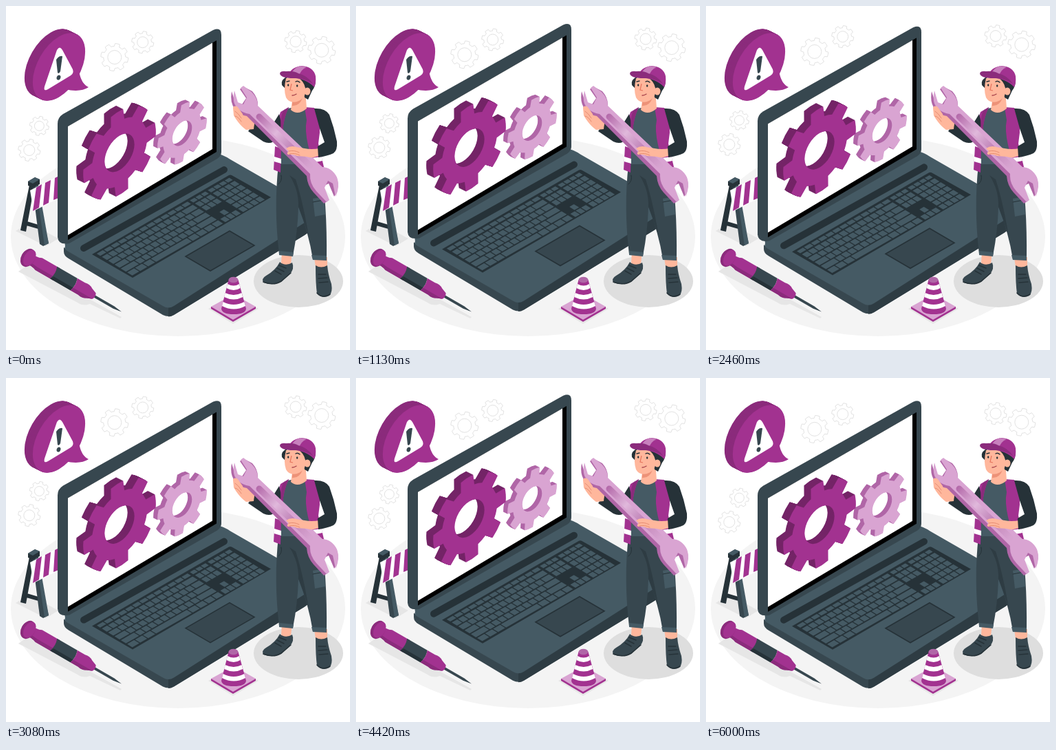
Write an HTML page that moves like this. It is 500 px wide and 500 px high and loops after 6.04 s.

```html
<!DOCTYPE html>
<html lang="en">
<head>
<meta charset="utf-8">
<title>Laptop repair</title>
<style>
html, body { margin: 0; width: 100%; height: 100%; overflow: hidden; background: #fff }
svg { display: block; width: 100vw; height: 100vh }
.p { fill: #a23290 } .d { fill: #742467 } .m { fill: #8b2b7c } .l { fill: #d9a4d2 } .e { fill: #b066a7 }
.s { fill: #455a64 } .g { fill: #37474f } .k { fill: #263238 } .w { fill: #fff } .h { fill: #e6e6e6 }
.skin { fill: #ffb79c } .shade { fill: #ed9278 }
.line { fill: none; stroke: #263238; stroke-linecap: round }
</style>
</head>
<body>
<svg viewBox="0 0 500 500">
<defs>
  <linearGradient id="shine" x1="365" y1="160" x2="442" y2="232" gradientUnits="userSpaceOnUse">
    <stop offset="0" stop-color="#b56bab"/><stop offset=".35" stop-color="#e0b8db"/>
    <stop offset=".65" stop-color="#c083b8"/><stop offset="1" stop-color="#d7a3d0"/>
  </linearGradient>
</defs>
<ellipse cx="250" cy="335" rx="243" ry="145" fill="#f4f4f4"/>
<g id="outlines" fill="none" stroke="#e2e2e2"></g>

<!-- speech bubble -->
<g id="disc"></g>
<path class="p" d="M106 94Q109 113 120 118Q108 126 86 121Z"/>
<path class="w" d="M74 64Q78 57 82 64L97 92Q99 98 94 101L61 121Q54 125 56 117Z"/>
<path class="g" d="M73 78Q77 72 82 73L79 95Q77 99 75 97Z"/>
<ellipse class="g" cx="76.500" cy="104" rx="2.800" ry="3.600" transform="rotate(20 76.500 104)"/>

<!-- barrier -->
<path class="h" d="M14 327L34 315L76 338L58 349Z"/>
<path class="k" d="M34 260L41 262L29 328L21 326ZM27 312L54 320V326L26 318Z"/>
<path class="g" d="M38 260L43 260L62 345L54 349L49 346Z"/>
<path class="s" d="M43 260L47 260L62 345L56 348Z"/>
<path class="w" d="M35 268L82 244V277L40 298Z"/>
<path class="p" d="M44 264L52 259L48 293L39 298ZM57 257L65 253L62 286L54 290ZM71 250L79 246V278L69 282Z"/>
<path class="k" d="M32 255L42 249L49 252V259L39 264L32 261Z"/>
<path class="s" d="M32 255L42 249L49 252L39 258Z"/>

<!-- laptop -->
<g id="laptop">
  <path class="g" d="M84 351V357Q84 363 91 367L228 449Q236 453 244 449L434 333Q444 327 444 318V298L236 436Z"/>
  <path fill="#2e3c43" d="M236 438V451.500Q240 451.500 244 449L434 333Q444 327 444 318V300Z"/>
  <path class="s" d="M86 349Q84 343 92 338L300 212Q318 217 326 223L434 285Q448 294 437 313L244 436Q236 441 228 436L89 356Q84 353 86 349Z"/>
  <path class="line" stroke-width="10" d="M113 352L317 238"/>
  <path class="k" d="M125 361L324 246Q326 245 328 246L385 278L184 395Z"/>
  <g id="keys" class="s" transform="matrix(1.99 -1.14 .57 .35 126 360)"></g>
  <path class="g" stroke="#263238" stroke-width="1.600" d="M261 364L325 327L361 348L297 385Z"/>
  <path class="g" d="M75 171Q75 162 83 157L301 35Q313 30 313 42V212Q313 218 307 222L92 345Q76 348 75 336Z"/>
  <path fill="#000" d="M90 175L306 50V212L90 340Z"/>
  <path class="w" d="M90 175L300 53.500V208L90 333Z"/>
  <g id="cogs"></g>
</g>

<!-- screwdriver -->
<path class="h" d="M18 386L32 376L168 452L166 454L122 433Q112 437 104 431Z"/>
<g transform="translate(32 366) rotate(30)">
  <path class="g" d="M108 -1.600H144L157 0L144 2H108Z"/>
  <path class="p" d="M0 -9Q10 -6 18 -10H48V10H18Q10 7 0 9Z"/>
  <path class="m" d="M3 4Q12 4 18 5H48V10H18Q10 7 0 9Z"/>
  <path class="g" d="M43 -10H77Q81 0 77 10H43Q47 0 43 -10Z"/>
  <path class="k" d="M46 5H79L77 10H43Z"/>
  <path class="p" d="M77 -10H90Q97 -12 103 -8L111 -5Q114 0 111 5L103 8Q97 12 90 10H77Q81 0 77 -10Z"/>
  <path class="m" d="M79 5H111L103 8Q97 12 90 10H77Z"/>
  <ellipse class="m" rx="10" ry="14"/>
  <ellipse class="p" cx="2" cy="-1" rx="8" ry="12.500"/>
</g>

<!-- cone -->
<path class="h" d="M294 440L331 419L367 440L330 462Z"/>
<path class="p" d="M298 437H363V440L330 459L298 440Z"/>
<path class="l" d="M298 437L331 419L363 437L330 456Z"/>
<path class="p" d="M323.500 398L313 440Q314 448 331 448Q348 448 349 440L337.500 398Z"/>
<path class="w" d="M322 404Q331 409 339 404L340.600 410Q331 416 320.500 410ZM318.700 417Q331 423 342.500 417L344.200 423Q331 430 317.200 423ZM315.500 430Q331 438 346.200 430L348 436Q331 445 314 436Z"/>
<ellipse class="e" cx="330.500" cy="398" rx="7" ry="4.300"/>

<!-- worker -->
<ellipse cx="425" cy="400" rx="65" ry="38" fill="#dedede"/>
<path class="skin" d="M401 357H416L414 375Q406 380 400 374ZM448 365H467V381Q458 386 450 380Z"/>
<path class="g" d="M398 372Q406 379 416 373Q420 382 412 390L400 401Q388 407 374 402Q371 396 378 392Q392 384 398 372ZM450 377Q458 382 467 377Q468 390 473 404Q475 416 470 421Q459 426 452 418Q450 404 450 377Z"/>
<path class="line" stroke-width="1.600" d="M374 401Q389 407 400 400L414 388M452 417Q460 426 471 419M391 385L400 390M394 381L404 386M397 377L407 381M454 390H465M454 396L467 395M455 402L468 401"/>
<path class="s" d="M404 151Q420 144 440 150L454 163V204L456 236H397L400 190Z"/>
<path class="g" d="M396 230H457Q467 285 466 369L446 368Q440 330 425 292Q424 328 417 363L397 361Q389 294 396 230Z"/>
<path class="k" d="M412 246Q426 268 425 292Q434 315 440 335Q432 286 421 252Z" opacity=".5"/>
<path class="s" d="M397 356L418 358L417 364L397 362ZM444 362L466 363V370L446 369ZM446 280L462 277L464 303L449 306Z"/>
<path class="line" stroke-width="1" d="M446 285L462 282M400 246Q402 254 396 259"/>

<path class="p" d="M399 154L411 147Q403 164 402 184L388 187ZM391 204L400 207L399 242L389 238ZM434 147L448 148Q457 159 456 184L454 200L462 234L448 238L439 202Q434 180 437 166Z"/>
<path class="w" d="M390 219L400 222V229L389.500 226ZM444 221L458.500 219L460 225L445 228Z"/>
<path class="m" d="M402 153L411 147Q403 164 402 184L396 185Z"/>

<path class="skin" d="M412 128L435 121L437 149Q424 160 414 151L416 138Z"/>
<path class="shade" d="M416 138Q425 140 431 134Q426 146 416 145Z"/>
<path class="k" d="M430 104L450 108Q450 117 445 123L439 136L434 133ZM408 103Q399 107 401 115L406 120L409 108Z"/>
<path class="skin" d="M407 105Q403 122 407 133Q412 142 423 139Q433 135 436 125L434 111L424 104Z"/>
<path class="k" d="M424 104Q433 109 435 119L443 119L447 108Z"/>
<ellipse class="skin" cx="438" cy="124" rx="4.500" ry="5.500"/>
<path class="line" stroke-width="1.400" d="M408 110L412 109M421 110Q424 108 427 111"/>
<path class="k" d="M409 115a1.200 1.700 0 1 0 2.400 0a1.200 1.700 0 1 0 -2.400 0M422 116a1.200 1.700 0 1 0 2.400 0a1.200 1.700 0 1 0 -2.400 0"/>
<path fill="none" stroke="#e6765e" stroke-width="1.200" d="M415 113L413 122L417 123"/>
<path fill="none" stroke="#a5404a" stroke-width="1.300" stroke-linecap="round" d="M416 130Q419 130 422 128"/>
<path class="p" d="M410 101Q414 89 429 87Q447 88 450 102Q451 112 448 118Q436 105 413 104Z"/>
<path fill="#c780bd" d="M416 96Q420 89 428 87L437 89Q428 92 425 104L414 103Z"/>
<path class="m" d="M398 98Q399 94 407 95Q418 94 425 98Q438 101 446 113Q433 104 418 105Q399 105 398 98Z"/>

<path class="k" d="M352 182L362 168L384 178L397 157Q403 174 394 192Q386 203 374 197Z"/>
<path class="skin" d="M330 147Q333 143 338 149L350 158L361 170L360 179L349 180Q339 173 332 160Z"/>

<!-- wrench -->
<path class="e" d="M328 124Q325 141 333 150Q341 159 350 160L437 247Q438 261 447 271L462 287L467 284L461 262L469 258L477 277Q485 266 481 250Q474 236 459 234L366 146Q367 134 358 124L345 117L340 121L349 134L343 143L333 140Z"/>
<path class="l" d="M332 123Q328 140 336 148Q344 156 354 157L442 244Q441 258 451 269L466 285L470 282L463 264L468 254L475 258L479 277Q486 262 481 249Q474 235 460 234L366 145Q366 134 357 125L345 116L341 119L350 133L345 143L337 140Z"/>
<path fill="none" stroke="url(#shine)" stroke-width="9" stroke-linecap="round" d="M368 161L442 232"/>
<path class="skin" d="M330 147Q335 143 339 150L344 157Q344 166 352 167L361 171L359 179L347 178Q337 170 331 159Z"/>
<path fill="none" stroke="#e58d73" stroke-width="1" stroke-linecap="round" d="M333 153Q338 156 342 163M333 160Q338 161 342 168"/>
<path class="skin" d="M407 207Q414 202 422 205L434 207Q443 209 456 207L457 217Q445 222 437 219L423 218Q417 215 410 216Q407 214 411 211Z"/>
<path fill="none" stroke="#e58d73" stroke-width="1" stroke-linecap="round" d="M411 211Q419 209 426 213M412 215Q420 213 427 217"/>
<path class="k" d="M448 149Q464 148 470 158Q477 177 481 197Q482 210 476 214Q467 218 454 220L453 204L463 198L456 178Z"/>
</svg>
<script>
const $ = id => document.getElementById(id);
const iso = (x, y) => `transform="matrix(.866 -.5 0 1 ${x} ${y})"`;
const ring = r => `M${r} 0A${r} ${r} 0 1 0 ${-r} 0A${r} ${r} 0 1 0 ${r} 0Z`;

// Eight-toothed wheel with a round hole
function cog(outer, root, hole, phase) {
  const at = (r, a) => `${(r * Math.cos(a)).toFixed(2)} ${(r * Math.sin(a)).toFixed(2)}`;
  let d = '';
  for (let i = 0; i < 8; i++) {
    const a = phase * Math.PI / 180 + i * Math.PI / 4;
    d += (i ? `A${root} ${root} 0 0 1 ` : 'M') + at(root, a - .245) +
      `L${at(outer, a - .17)}A${outer} ${outer} 0 0 1 ${at(outer, a + .17)}L${at(root, a + .245)}`;
  }
  return d + 'Z' + ring(hole);
}

// Thick flat shape: side copies behind the front face
function solid(x, y, d, side, face, depth) {
  let out = '';
  for (let i = depth; i >= 0; i -= .5)
    out += `<path class="${i ? side : face}" fill-rule="evenodd" d="${d}" ${iso(x - i, y - i / 2)}/>`;
  return out;
}

$('cogs').innerHTML =
  solid(256, 185, cog(41.5, 32, 16.5, 8), 'e', 'l', 6) +
  solid(165, 213.5, cog(61, 46.5, 25, -4), 'd', 'p', 10);
$('disc').innerHTML = solid(77, 88.5, ring(44), 'm', 'p', 12);

$('outlines').innerHTML = [
  [157.8, 74.5, 20], [198.7, 52.7, 16], [421, 51.7, 16], [458.8, 64.3, 20], [48.4, 174.3, 14], [33.8, 209.5, 16]
].map(([x, y, r]) =>
  `<path transform="translate(${x} ${y})" stroke-linejoin="round" d="${cog(r, r * .8, r * .5, 12)}"/>`).join('');

// Keyboard: each row lists relative key widths
const ones = n => Array(n).fill(1);
const rows = [
  ones(13), [...ones(13), 2], [1.5, ...ones(12), 1.5], [1.8, ...ones(11), 2.2],
  [2.3, ...ones(10), 2.7], [1.3, 1.3, 1.3, 6, 1.3, 1.3, 1.3, 1.2]
];
let keys = '';
function block(x, width, row, sizes) {
  const unit = width / sizes.reduce((a, b) => a + Math.abs(b), 0);
  const y = row ? 18 + (row - 1) * 16.1 : 5;
  for (const s of sizes) {
    if (s > 0) keys += `<rect x="${x}" y="${y}" width="${s * unit - .65}" height="${row ? 13.2 : 9}" rx=".4"/>`;
    x += Math.abs(s) * unit;
  }
}
rows.forEach((sizes, i) => {
  block(1.5, 67, i, sizes);
  if (i !== 3) block(69.5, 12, i, i === 4 ? [-1, 1, -1] : ones(3));
  block(82.5, 16.5, i, ones(4));
});
$('keys').innerHTML = keys;

const LOOP = 6040;
const rise = (t, period) => -10 * (1 - Math.abs(2 * (t % period) / period - 1));
const start = performance.now();
function draw() {
  const t = (performance.now() - start) % LOOP;
  $('laptop').setAttribute('transform', `translate(0 ${rise(t, LOOP / 2)})`);
  $('outlines').setAttribute('transform', `translate(0 ${rise(t, LOOP)})`);
  requestAnimationFrame(draw);
}
draw();
</script>
</body>
</html>
```
